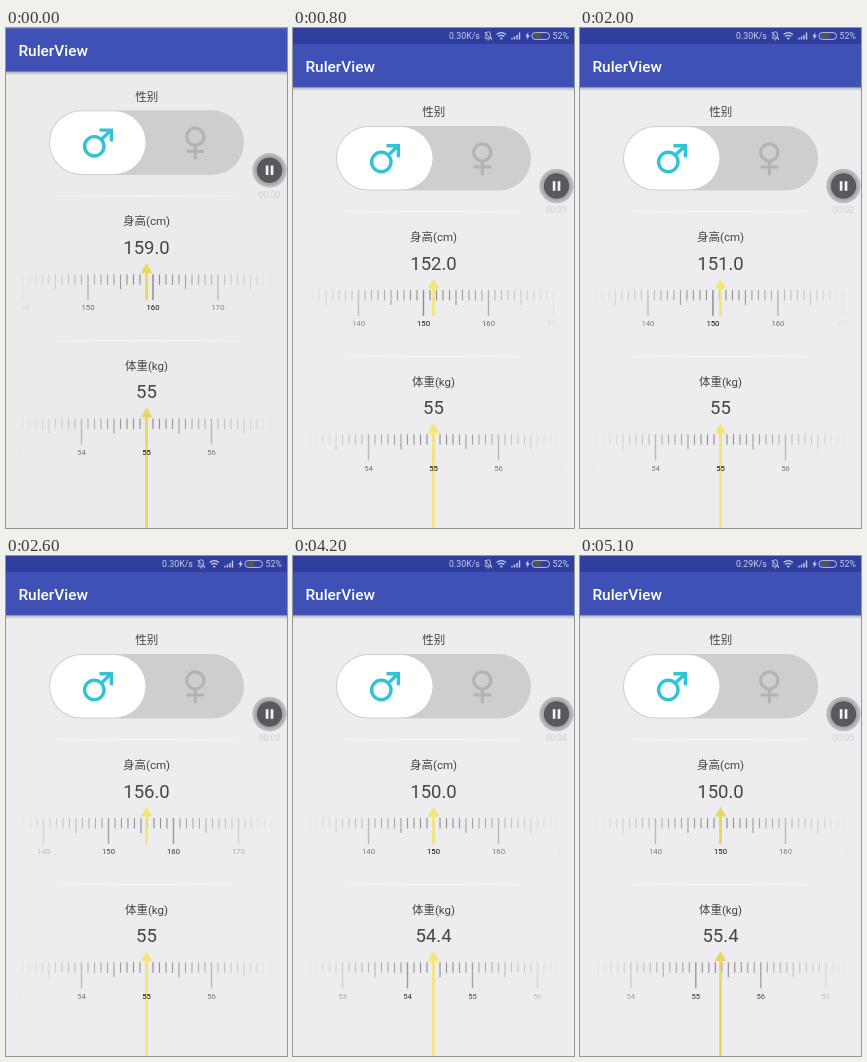
An HTML page that plays this animation: 281 by 500 pixels, repeating every 5.2 s.

```html
<!DOCTYPE html>
<html lang="zh">
<head>
<meta charset="utf-8">
<title>RulerView</title>
<style>
  html, body { margin: 0; width: 100%; height: 100%; overflow: hidden; background: #ededef; }
  svg { display: block; width: 100vw; height: 100vh; }
  text { font-family: Roboto, "Noto Sans CJK SC", "Noto Sans CJK", sans-serif; }
  .mid { text-anchor: middle; }
  .head { font-size: 11.5px; fill: #444; }
  .value { font-size: 18.5px; fill: #45454a; }
  .label { font-size: 7.7px; fill: #000; }
  .status { font-size: 8.8px; fill: #c9cdea; }
</style>
</head>
<body>
<svg viewBox="0 0 281 500">
  <defs>
    <linearGradient id="fade">
      <stop offset="0" stop-color="#fff" stop-opacity="0"/>
      <stop offset=".5" stop-color="#fff"/>
      <stop offset="1" stop-color="#fff" stop-opacity="0"/>
    </linearGradient>
    <linearGradient id="shade" x2="0" y2="1">
      <stop offset="0" stop-opacity=".28"/>
      <stop offset="1" stop-opacity="0"/>
    </linearGradient>
    <mask id="edges" maskUnits="userSpaceOnUse" x="0" y="0" width="281" height="520">
      <rect x="11" width="259" height="520" fill="url(#fade)"/>
    </mask>
  </defs>
  <rect id="page" width="281" height="500"/>
  <g id="screen">
    <rect y="59" width="281" height="4" fill="url(#shade)"/>
    <rect y="16" width="281" height="43.3" fill="#3f51b5"/>
    <rect width="281" height="16" fill="#303f9f"/>
    <text x="12.5" y="43.7" font-size="15.4" font-weight="500" fill="#fff">RulerView</text>

    <text id="speed" class="status" x="156" y="11.2"></text>
    <g fill="none" stroke="#c9cdea">
      <path d="M192 10.2h6.4l-1-1.6v-2.6a2.2 2.2 0 0 0-4.4 0v2.6zM194.3 11.8h1.8M191.5 4l7.5 8" stroke-width=".9"/>
      <path d="M203.7 6.6q4.6-3.8 9.2 0M205.4 8.6q2.9-2.3 5.8 0" stroke-width="1.3"/>
      <path d="M219 11.5v-1.8M221.5 11.5v-3M224 11.5v-4.5M226.5 11.5v-7" stroke-width="1.4"/>
      <rect x="239" y="4.6" width="17.5" height="6.8" rx="3.2" stroke-width=".9"/>
    </g>
    <circle cx="208.3" cy="10.6" r="1.1" fill="#c9cdea"/>
    <path d="M235.5 4l-3.2 4.6h2l-.8 3.4 3.4-4.8h-2z" fill="#c9cdea"/>
    <rect x="240.5" y="6" width="8.5" height="4" rx="2" fill="#55583a"/>
    <text class="status" x="259.5" y="11.2">52%</text>

    <text class="mid head" x="140.7" y="88.3">性别</text>
    <rect x="43" y="98" width="195" height="64.6" rx="32.3" fill="#cfcdd0"/>
    <rect x="44" y="99" width="95.5" height="62.6" rx="31.3" fill="#fff"/>
    <g fill="none" stroke="#30c3d8" stroke-width="3.4">
      <circle cx="88.3" cy="134" r="9.7"/>
      <path d="M95.5 127L105.3 117.6M93.5 117.8H105.4V129.2"/>
    </g>
    <g fill="none" stroke="#b4b2b6" stroke-width="3.2">
      <circle cx="189.3" cy="124.4" r="8.6"/>
      <path d="M189.3 133V147.3M180.6 139H198"/>
    </g>
    <rect x="25" y="183" width="231" height="1" fill="url(#fade)"/>
    <rect x="25" y="328" width="231" height="1" fill="url(#fade)"/>

    <g id="rulers"></g>

    <circle cx="263.5" cy="158" r="17.2" fill="#bcbbc0"/>
    <circle cx="263.5" cy="158" r="15" fill="#aaa9ae"/>
    <circle cx="263.5" cy="158" r="12.7" fill="#59585d"/>
    <path d="M261.1 153.2v9.6M266 153.2v9.6" stroke="#f4f4f6" stroke-width="2.7"/>
    <text id="timer" class="mid" x="263.2" y="185.3" font-size="8.9" fill="#d0d0d4"></text>
  </g>
</svg>
<script>
const LOOP = 5200, FRAME = 100, CENTER = 140.5, GAP = 6.5;
const NS = "http://www.w3.org/2000/svg";
const $ = id => document.getElementById(id);

// Positions are counted in ticks: 1 cm or 0.1 kg.
const heightKeys = [[0, 159], [800, 151.54], [1500, 147.6], [2600, 155.85], [3000, 150]];
const weightKeys = [[3400, 550], [3500, 548], [4200, 544], [5100, 553.8]];

function add(parent, tag, attrs, text = "") {
  const el = document.createElementNS(NS, tag);
  for (const name in attrs) el.setAttribute(name, attrs[name]);
  el.textContent = text;
  return parent.appendChild(el);
}

function makeRuler({ title, top, from, to, labelScale, stemEnd }) {
  const root = $("rulers");
  add(root, "text", { class: "mid head", x: CENTER, y: top - 48.8 }, title);
  const value = add(root, "text", { class: "mid value", x: CENTER, y: top - 20.2 });
  const layer = () => add(add(root, "g", { mask: "url(#edges)" }), "g", {});
  const ticks = layer();
  const arrow = add(root, "path", {
    d: `M${CENTER} ${top - 11}l5.9 9.6h-4.6V${stemEnd}h-2.6V${top - 1.4}h-4.6z`
  });
  const labels = layer();
  for (let n = from; n <= to; n++) {
    const x = (n - from) * GAP, major = n % 10 === 0;
    const size = major ? 26 : n % 5 === 0 ? 15 : 10.5;
    add(ticks, "path", {
      d: `M${x} ${top}v${size}`, stroke: "#858589", "stroke-width": major ? 1.4 : 1.1
    });
    if (major) add(labels, "text", { class: "mid label", x, y: top + 36.2 }, n / labelScale);
  }
  return (pos, text, color) => {
    const shift = `translate(${CENTER + (from - pos) * GAP} 0)`;
    ticks.setAttribute("transform", shift);
    labels.setAttribute("transform", shift);
    arrow.setAttribute("fill", color);
    value.textContent = text;
  };
}

// Smooth curve through the keys, at rest at every turning point.
function curve(keys, t) {
  const last = keys.length - 1;
  if (t <= keys[0][0]) return keys[0][1];
  if (t >= keys[last][0]) return keys[last][1];
  const rate = i => (keys[i + 1][1] - keys[i][1]) / (keys[i + 1][0] - keys[i][0]);
  const slope = i => {
    if (i === 0 || i === last) return 0;
    const a = rate(i - 1), b = rate(i);
    return a * b > 0 ? 2 * a * b / (a + b) : 0;
  };
  const i = keys.findIndex(k => k[0] > t) - 1;
  const [t0, a] = keys[i], [t1, b] = keys[i + 1];
  const span = t1 - t0, u = (t - t0) / span, v = 1 - u;
  return a * v * v * (1 + 2 * u) + b * u * u * (3 - 2 * u)
    + span * u * v * (slope(i) * v - slope(i + 1) * u);
}

const setHeight = makeRuler({
  title: "身高(cm)", top: 262, from: 120, to: 185, labelScale: 1, stemEnd: 288
});
const setWeight = makeRuler({
  title: "体重(kg)", top: 406.3, from: 510, to: 590, labelScale: 10, stemEnd: 520
});

function draw(t) {
  const fullscreen = t < 100;
  $("screen").setAttribute("transform", `translate(0 ${fullscreen ? -15.7 : 0})`);
  $("page").setAttribute("fill", fullscreen ? "#ebebeb" : "#ededef");
  $("speed").textContent = t < 4700 ? "0.30K/s" : "0.29K/s";
  $("timer").textContent = "00:0" + Math.floor((t + 300) / 1000);
  const color = fullscreen || t >= 4700 ? "#e9d662" : "#f5e476";
  const cm = curve(heightKeys, t), kg = curve(weightKeys, t);
  setHeight(cm, Math.round(cm).toFixed(1), color);
  setWeight(kg, t < 3500 ? "55" : (Math.round(kg) / 10).toFixed(1), color);
}

const start = performance.now();
function tick() {
  const t = (performance.now() - start) % LOOP;
  draw(Math.floor(t / FRAME) * FRAME);
  requestAnimationFrame(tick);
}
tick();
</script>
</body>
</html>
```
